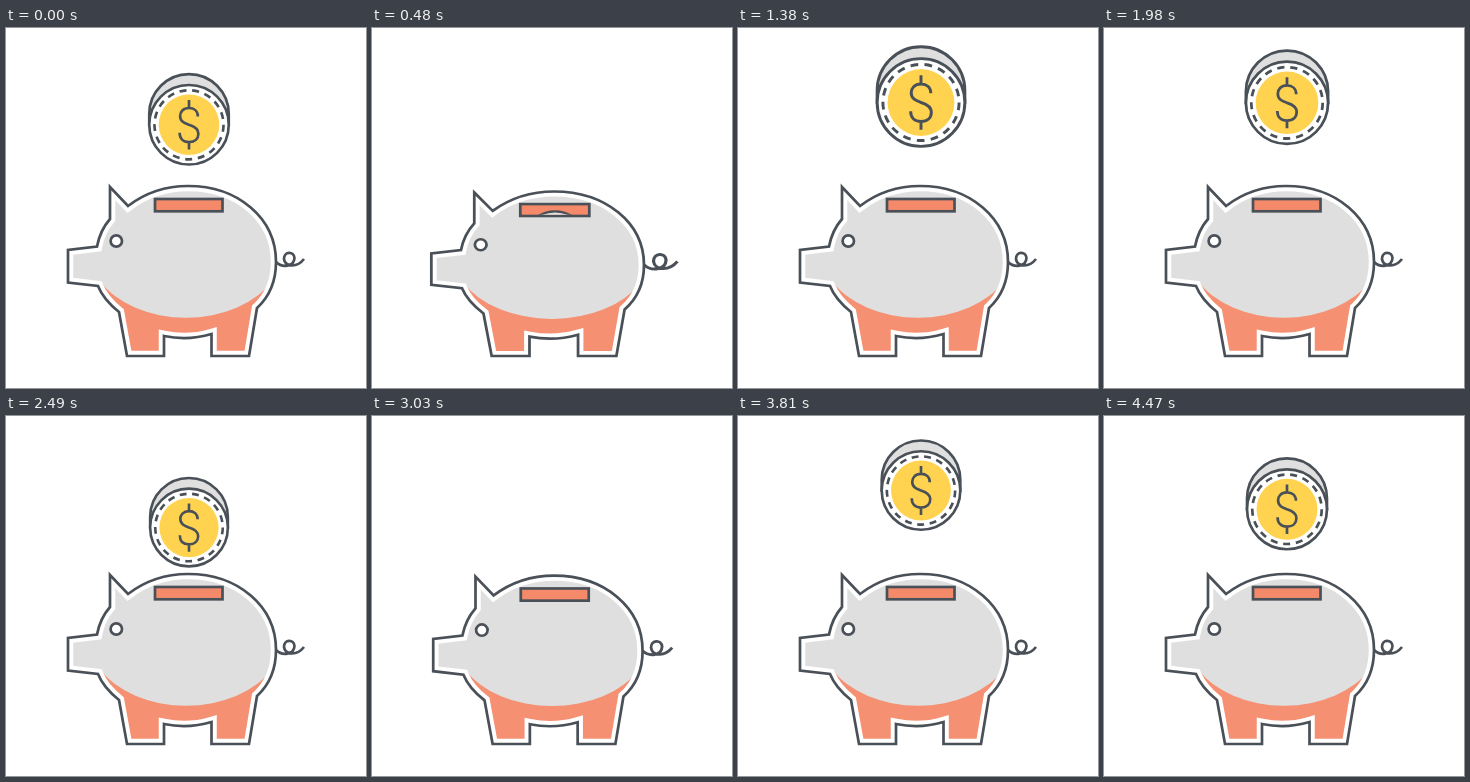
An HTML page for the animation above (4500 ms loop, 360 by 360 pixels).

```html
<!DOCTYPE html>
<html lang="en">
<head>
<meta charset="utf-8">
<title>Piggy bank</title>
<style>
  html, body { margin: 0; height: 100%; overflow: hidden; background: #fff; }
  svg { display: block; width: 100vw; height: 100vh; }
  .line { stroke: #4a5057; stroke-width: 2.7; }
</style>
</head>
<body>
<svg viewBox="0 0 360 360" fill="none">
  <defs>
    <path id="body" d="M104 159L122 178C139 165 160 158 182 158C232 158 270 190 270 234C270 253 263 269 251 280L243 328H205.500V306Q182 313 158 308V328H121L113 284C103 276 96 268 92 258L62 254.500V222L91 218.500C93 208 97 199 104 191Z"/>
    <clipPath id="inside"><use href="#body"/></clipPath>
    <clipPath id="above"><rect id="opening" width="360" height="182"/></clipPath>
  </defs>
  <g id="pig">
    <use href="#body" fill="#dfdfdf"/>
    <path clip-path="url(#inside)" fill="#f59072" d="M94 253A96 66 0 0 0 266 253V330H94Z"/>
    <use href="#body" stroke="#fff" stroke-width="10.500"/>
    <use href="#body" class="line"/>
    <circle class="line" cx="110.300" cy="213" r="5.700" fill="#fff"/>
    <rect class="line" x="149" y="171" width="67.500" height="12.300" fill="#f58a6b"/>
    <path id="tail" class="line" stroke-width="2.400" d="M270 234C276 240 288 239 288.500 230C288 223 278 223 278 231C279 239 291 240 298 231"/>
  </g>
  <g clip-path="url(#above)">
    <g id="coin">
      <path class="line" fill="#dfdfdf" d="M-40.300 0V-11A40.300 40.300 0 0 1 40.300 -11V0Z"/>
      <circle class="line" r="40.300" fill="#fff"/>
      <circle class="line" r="35" pathLength="170" stroke-dasharray="5.500 4.500"/>
      <circle r="30.700" fill="#ffd350"/>
      <path class="line" d="M9 -8.500C9 -14 5 -17 0 -17C-6 -17 -9 -13 -9 -9C-9 -3 -4 -1.500 0 0C5 1.500 9.500 3.500 9.500 9C9.500 14 6 17.500 0 17.500C-6 17.500 -9.500 14 -9.500 8M0 -25V-17M0 17.500V25"/>
    </g>
  </g>
</svg>
<script>
const LOOP = 4500, FLOOR = 328, CENTER = 181;
const [pig, tail, coin, opening] = ['pig', 'tail', 'coin', 'opening'].map(id => document.getElementById(id));
const clamp = u => Math.min(1, Math.max(0, u));
const smooth = (t, from, to) => {
  const u = clamp((t - from) / (to - from));
  return u * u * (3 - 2 * u);
};
const set = (node, transform) => node.setAttribute('transform', transform);
const scaleAt = (x, y, sx, sy) => `translate(${x} ${y}) scale(${sx} ${sy}) translate(${-x} ${-y})`;

// Two unequal coin drops per loop; the second is in progress 2390 ms in.
const phaseAt = t => t < 1000 ? t : t < 3200 ? t - 2390 : t - LOOP;

// Springy entrance: overshoot, undershoot, settle.
function popScale(age) {
  const rest = 1 - clamp(age / 240);
  return 1.09 * (1 - rest * rest) - 0.115 * smooth(age, 240, 580) + 0.045 * smooth(age, 580, 780);
}

function draw(t) {
  const phase = phaseAt(t);

  const squash = 1.3 * (smooth(phase, 210, 395) - smooth(phase, 395, 760));
  const height = 1 - 0.029 * squash;
  set(pig, scaleAt(CENTER, FLOOR, 1 + 0.02 * squash, height));
  const curl = 1 + 0.15 * squash;
  set(tail, scaleAt(270, 236, curl, curl));
  opening.setAttribute('height', FLOOR - (FLOOR - 182) * height);

  const drop = Math.max(0, 0.0052 * (phase + 540)) ** 3;
  const size = Math.max(0, popScale(phase + 1275) - 0.0015 * Math.min(drop, 200));
  coin.style.display = size > 0 && drop < 250 ? '' : 'none';
  set(coin, `translate(183 ${74.5 + drop}) scale(${size})`);
}

function tick() {
  draw(performance.now() % LOOP);
  requestAnimationFrame(tick);
}
tick();
</script>
</body>
</html>
```
